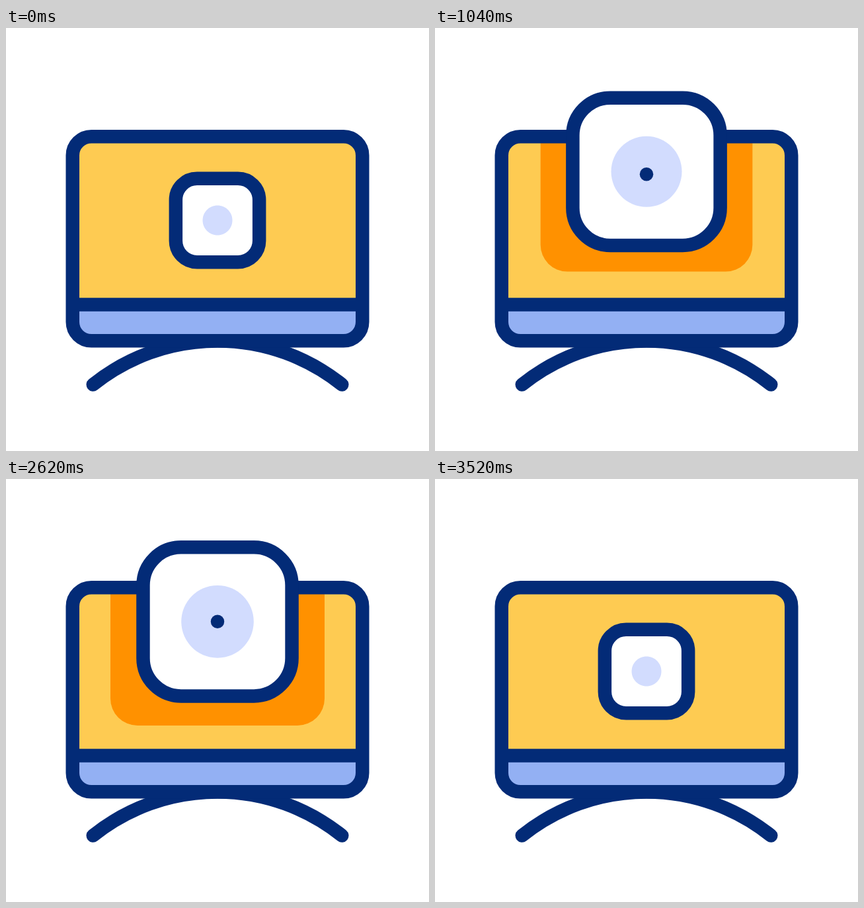
These frames come from a looping animation (640 px wide and 640 px high, 3.6 s). An HTML page:

```html
<!DOCTYPE html>
<html lang="en">
<head>
<meta charset="utf-8">
<title>Webcam on a monitor</title>
<style>
  html, body { margin: 0; width: 100%; height: 100%; overflow: hidden; background: #fff; }
  svg { display: block; width: 100vw; height: 100vh; }
  .line { stroke: #032b77; stroke-width: 20.5; stroke-linecap: round; }
</style>
</head>
<body>
<svg viewBox="0 0 640 640">
  <defs>
    <clipPath id="screen"><rect x="100.75" y="164.25" width="438.5" height="254"/></clipPath>
  </defs>
  <path class="line" fill="none" d="M131.75 539.5A301.5 301.5 0 0 1 508.25 539.5"/>
  <rect x="100.75" y="164.25" width="438.5" height="309" rx="28.5" fill="#fecb52"/>
  <path fill="#93b0f3" d="M100.75 418.5H539.25V444.75A28.5 28.5 0 0 1 510.75 473.25H129.25A28.5 28.5 0 0 1 100.75 444.75Z"/>
  <g clip-path="url(#screen)"><rect id="shadow" fill="#ff9100"/></g>
  <path class="line" style="stroke-linecap:butt" d="M100.75 418.5H539.25"/>
  <rect class="line" x="100.75" y="164.25" width="438.5" height="309" rx="28.5" fill="none"/>
  <rect id="camera" class="line" fill="#fff"/>
  <path id="lens" fill="#d2dcfe"/>
  <circle id="pupil" cx="320" fill="#032b77"/>
</svg>
<script>
const LOOP = 3600, CX = 320;
const [shadow, camera, lens, pupil] =
  ['shadow', 'camera', 'lens', 'pupil'].map(id => document.getElementById(id));

const mix = (a, b, k) => a + (b - a) * k;
const span = (t, from, to) => Math.min(1, Math.max(0, (t - from) / (to - from)));
const smooth = u => u * u * (3 - 2 * u);

// Cubic easing with control points (x1, 0) and (x2, 1)
function ease(u, x1, x2) {
  let lo = 0, hi = 1;
  for (let i = 0; i < 24; i++) {
    const s = (lo + hi) / 2, r = 1 - s;
    if (3 * x1 * s * r * r + 3 * x2 * s * s * r + s * s * s < u) lo = s;
    else hi = s;
  }
  return smooth((lo + hi) / 2);
}

function set(el, attrs) {
  for (const name in attrs) el.setAttribute(name, attrs[name]);
}

function box(el, width, bottom, height, radius) {
  set(el, { x: CX - width / 2, y: bottom - height, width, height, rx: radius });
}

// Disc whose top edge can fold down onto its bottom edge
function disc(y, r, top) {
  const k = 0.5523, kx = r * k, l = CX - r, R = CX + r;
  const half = (from, to, edge) => {
    const cy = mix(y, edge, k), d = Math.sign(to - from) * kx;
    return `C${from} ${cy} ${CX - d} ${edge} ${CX} ${edge}` +
           `C${CX + d} ${edge} ${to} ${cy} ${to} ${y}`;
  };
  return `M${l} ${y}${half(l, R, top)}${half(R, l, y + r)}Z`;
}

function draw(t) {
  const back = ease(span(t, 2400, 3520), 0.84, 0.6);
  const rise = ease(span(t, 200, 1320), 0.4, 0.2) - back;
  const follow = ease(span(t, 200, 1500), 0.4, 0.2) - back;
  const size = t < 2400 ? rise : 1 - ease(span(t, 2740, 3520), 0.8, 0.6);
  const dot = smooth(span(t, 260, 560)) - smooth(span(t, 3160, 3460));
  const blink = smooth(span(t, 1580, 2000)) - smooth(span(t, 2000, 2400));

  const y = mix(291, 214.2, rise);
  const side = mix(126.3, 227.3, rise);
  box(camera, side, y + side / 2, side, side * 0.255);

  const width = mix(146, 328, rise);
  box(shadow, width, mix(143, 378, rise), 300, width * 0.126);

  const r = mix(22.5, 54.8, size);
  lens.setAttribute('d', disc(y + 15 * blink, r, y - r + 125 * blink));
  set(pupil, { cy: mix(291, 214.2, follow) + 33 * blink, r: 10.25 * dot });
}

function tick() {
  draw(performance.now() % LOOP);
  requestAnimationFrame(tick);
}
tick();
</script>
</body>
</html>
```
